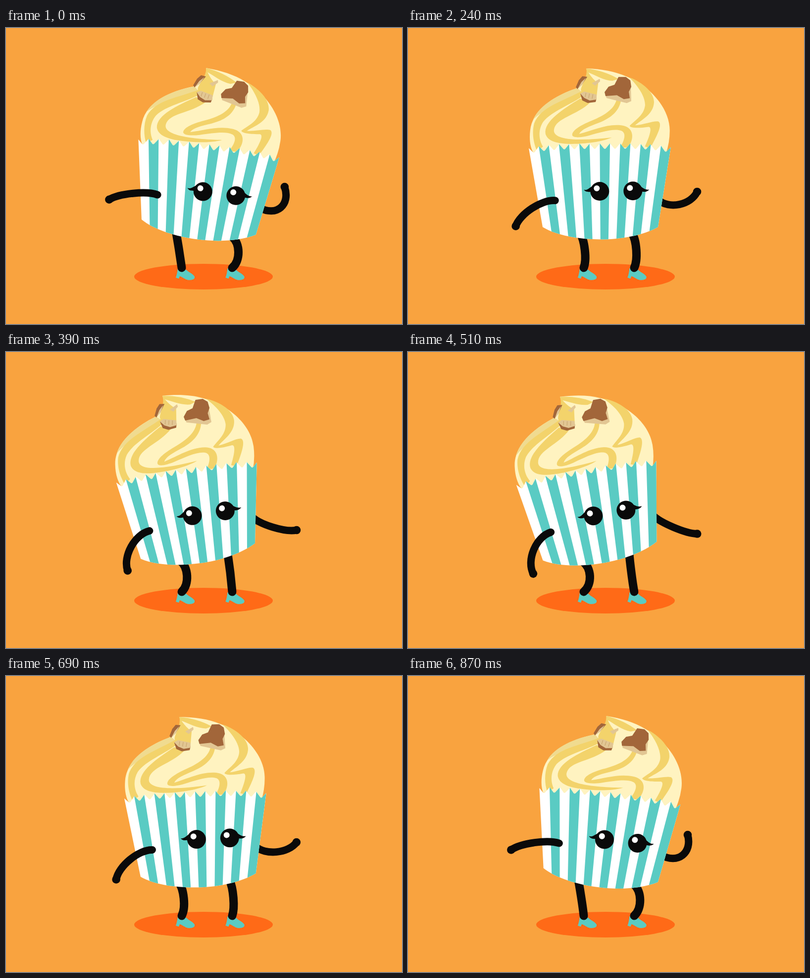
These frames come from a looping animation (800x600 px, 0.9 s). An HTML page:

```html
<!DOCTYPE html>
<html lang="en">
<head>
<meta charset="utf-8">
<title>Dancing cupcake</title>
<style>
  html, body { margin: 0; width: 100%; height: 100%; overflow: hidden; background: #f9a33f; }
  svg { display: block; width: 100%; height: 100%; }
  .limb { fill: none; stroke: #0a0a0a; stroke-linecap: round; }
  .arm { stroke-width: 15; }
  .leg { stroke-width: 17; }
  .gold { fill: #f3d36b; }
  .brown { fill: #a2663a; }
  .nut { fill: #e2c693; }
  .grain { fill: none; stroke: #c9a670; stroke-width: 9; stroke-dasharray: 1.2 6; }
  .teal { fill: #5acbc3; }
  .ink { fill: #0a0a0a; }
</style>
</head>
<body>
<svg viewBox="0 0 800 600">
  <defs>
    <clipPath id="cup"><path id="cupShape"/></clipPath>
    <path id="shoe" class="teal" d="M347 487Q346 498 343 506L349 508L351 503C358 505 362 511 370 511C377 511 382 509 381 504C378 498 370 496 364 490Z"/>
    <circle id="hand" class="ink" r="8.3"/>
  </defs>
  <rect width="800" height="600" fill="#f9a33f"/>
  <ellipse cx="399" cy="504" rx="140" ry="26" fill="#ff6a17"/>
  <use href="#shoe"/>
  <use href="#shoe" x="100.5"/>
  <path id="legL" class="limb leg"/>
  <path id="legR" class="limb leg"/>
  <path id="armR" class="limb arm"/>
  <use id="handR" href="#hand"/>

  <g id="body">
    <path fill="#fff3c0" d="M359 82C390 83 418 88 440 98C485 116 528 160 528 208Q528 232 520 256L254 256C246 243 244 226 246 208C250 167 294 138 338 123Q352 116 357 106Q362 94 359 82Z"/>
    <path fill="#f0db90" d="M341 122C300 136 265 157 252 186C274 164 315 152 352 132Z"/>
    <g class="gold">
      <path d="M354 126C310 150 267 160 254 194C249 214 253 234 260 250L272 241C263 226 262 207 272 191C290 168 325 158 358 134Z"/>
      <path d="M347 143C312 165 273 190 277 215C281 229 298 234 320 235C350 236 388 232 411 222C360 228 292 231 294 207C297 182 340 178 368 150Z"/>
      <path d="M359 82C362 98 351 112 348 125L352 142L380 138L383 112Q372 104 363 90C378 96 394 106 412 107L424 103Q395 86 359 82Z"/>
      <path d="M420 146C415 165 395 178 365 190C345 199 331 208 331 217C332 224 350 222 365 218C390 211 415 203 430 208C440 212 438 225 428 242L444 242C458 222 455 200 430 197C400 194 375 207 345 215C350 205 365 200 385 192C410 182 425 168 429 148Z"/>
      <path d="M446 100C464 118 478 138 478 156C476 176 460 185 447 198C448 203 465 203 485 200C494 200 486 222 478 240L489 243C500 222 515 195 505 189C495 187 478 195 458 197C470 186 495 175 496 150C496 132 478 114 452 102Z"/>
    </g>

    <path class="nut" d="M398 136L449 119L450 148L441 152L400 142Z"/>
    <path class="brown" d="M424 99L439 99L448 106L450 119L445 129L447 142L435 144L421 136L398 138L396 130L404 119L416 115Z"/>
    <path class="brown" d="M351 98L361 99L351 114L341 124L338 120L344 106Z"/>
    <path class="nut" d="M358 101L351 115L342 123L349 110ZM370 112L386 103L387 108L377 117Z"/>
    <path class="brown" d="M347 133L380 142L378 150L362 152L351 147Z"/>
    <path class="nut" d="M347 133L355 129L380 135L380 145L366 147L355 142Z"/>
    <path class="grain" d="M357 136L378 140"/>

    <g clip-path="url(#cup)">
      <rect x="235" y="225" width="305" height="210" fill="#fff"/>
      <path id="stripes" class="teal"/>
    </g>

    <g class="ink">
      <circle cx="387" cy="331" r="19"/>
      <circle cx="454" cy="330" r="19"/>
      <path d="M378 318C367 321 364 330 355 328C359 334 366 332 372 332Z"/>
      <path d="M463 317C472 321 477 329 487 327C482 333 475 332 469 331Z"/>
    </g>
    <g fill="#fff">
      <circle cx="381" cy="325" r="6"/>
      <circle cx="448" cy="324" r="6"/>
    </g>
  </g>

  <path id="armL" class="limb arm"/>
  <use id="handL" href="#hand"/>
</svg>
<script>
  const $ = id => document.getElementById(id);
  const LOOP = 900, STEP = 30, PEAK = 30;
  const TILT_MAX = 8.1, TILT_RANGE = 17.5;
  const PIVOT = { x: 388, y: 410 };
  const rad = deg => deg * Math.PI / 180;

  // Wrapper: 14 stripes, with a peak at every stripe edge
  const COUNT = 14;
  const topX = k => 243.3 + 20.5 * k;
  const lowX = k => 271.8 + 16.68 * k;
  const edgeX = (k, y) => topX(k) + (lowX(k) - topX(k)) * (y - 242) / 162;
  const peakY = k => {
    const u = k / 7 - 1;
    return 234 + 8.5 * u ** 4 - 1.5 * u;
  };

  function buildWrapper() {
    let rim = `M${topX(0)} ${peakY(0)}`, bars = "";
    for (let k = 0; k < COUNT; k++) {
      const x = topX(k + 0.5), y = (peakY(k) + peakY(k + 1)) / 2 + 10;
      rim += `L${x - 2} ${y}Q${x} ${y + 2} ${x + 2} ${y}L${topX(k + 1)} ${peakY(k + 1)}`;
      if (k % 2) {
        bars += `M${edgeX(k, 225)} 225H${edgeX(k + 1, 225)}L${edgeX(k + 1, 435)} 435H${edgeX(k, 435)}Z`;
      }
    }
    $("cupShape").setAttribute("d", rim + "L505 403C475 420 431 428.5 388 428.5C345 428.5 300 421 272 404Z");
    $("stripes").setAttribute("d", bars);
  }

  // Eased swing there and back, as body tilt in degrees
  function tiltAt(t) {
    const phase = ((t - PEAK + LOOP) % LOOP) / (LOOP / 2);
    const p = 1 - Math.abs(phase - 1);
    return TILT_MAX - TILT_RANGE * p * p * (3 - 2 * p);
  }

  // Follows a point fixed to the body
  function onBody(x, y, tilt) {
    const c = Math.cos(rad(tilt)), s = Math.sin(rad(tilt));
    const dx = x - PIVOT.x, dy = y - PIVOT.y;
    return [PIVOT.x + dx * c - dy * s, PIVOT.y + dx * s + dy * c];
  }

  // Bent limb: bow is how far its middle leaves the straight line; returns the far end
  function limb(id, [x, y], angle, length, bow) {
    const c = Math.cos(angle), s = Math.sin(angle);
    const at = (f, side) => [x + c * f * length - s * side, y + s * f * length + c * side];
    const end = at(1, 0), reach = bow * 4 / 3;
    $(id).setAttribute("d", `M${x} ${y}C${[at(0.22, reach), at(0.78, reach), end].join(" ")}`);
    return end;
  }

  function arm(side, shoulder, angle, length, bow) {
    const end = limb("arm" + side, shoulder, rad(angle), length, bow);
    $("hand" + side).setAttribute("transform", `translate(${end})`);
  }

  function leg(id, footX, lean, sign) {
    const hip = [footX - 6.5 + sign * 1.5 + 0.57 * lean, 415 + lean];
    const dx = footX - hip[0], dy = 486 - hip[1];
    limb(id, hip, Math.atan2(dy, dx), Math.hypot(dx, dy), -6.5 - 0.8 * lean);
  }

  function draw(t) {
    const tilt = tiltAt(t);
    $("body").setAttribute("transform", `rotate(${tilt} ${PIVOT.x} ${PIVOT.y})`);
    arm("L", onBody(297, 350, tilt), 146 + 3.6 * tilt, 95 + 0.4 * tilt, 12.5 - 0.6 * tilt);
    arm("R", onBody(505, 348, tilt), -11 - 3.7 * tilt, 81 - 1.9 * tilt, 17.5 + 1.2 * tilt);
    leg("legL", 355, -tilt, -1);
    leg("legR", 457, tilt, 1);
  }

  buildWrapper();
  const start = performance.now();
  function tick() {
    const t = (performance.now() - start) % LOOP;
    draw(Math.floor(t / STEP) * STEP);
    requestAnimationFrame(tick);
  }
  tick();
</script>
</body>
</html>
```
